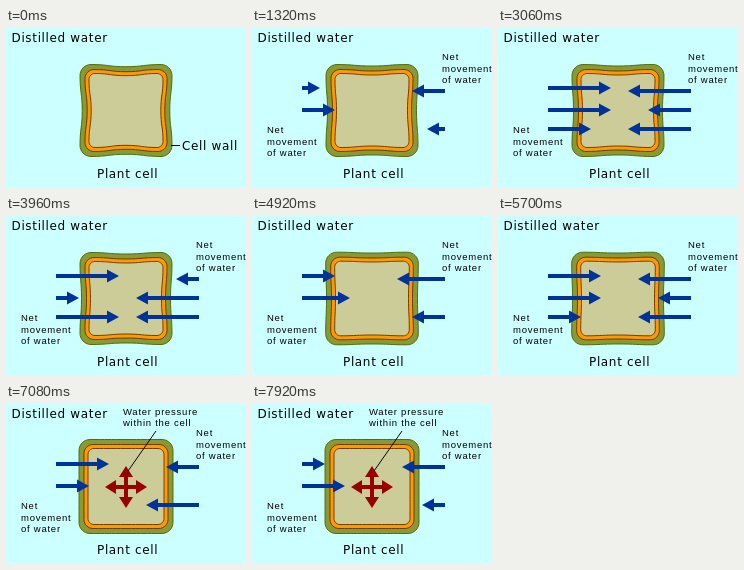
An HTML page that plays this animation: 240 px wide and 160 px high, repeating every 8000 ms.

```html
<!DOCTYPE html>
<html lang="en">
<head>
<meta charset="utf-8">
<title>Water entering a plant cell</title>
<style>
html, body { margin: 0; width: 100%; height: 100%; overflow: hidden; background: #cff; }
svg { display: block; width: 240px; height: 160px; }
text { font: 12px "DejaVu Sans", sans-serif; letter-spacing: .65px; fill: #000; }
text.small { font: 9.5px "Liberation Sans", sans-serif; letter-spacing: .75px; }
</style>
</head>
<body>
<svg id="stage" viewBox="0 0 240 160"></svg>
<script>
const LOOP = 8000, TICK = 180, STEP = 5, HEAD = 13;
const BLUE = '#039', RED = '#900';
const stage = document.getElementById('stage');

// Each run: start, end, longest length. Arrows grow one step per tick.
const upper = [[600, 3540, 63], [3600, 6300, 53], [6360, LOOP, 43]];
const outer = [[1140, 4080, 63], [4140, 7500, 53], [7560, LOOP, 43]];
const inner = [[1980, 4920, 63], [4980, 6840, 53]];
// side (1 points right), y, runs, first time shown
const arrows = [
  [1, 60, outer, 0], [1, 82, upper, 960], [1, 101, inner, 0],
  [-1, 63, upper, 0], [-1, 82, inner, 0], [-1, 101, outer, 0]
];

// Cell shapes: time, growth of the outline, dent of the sides
const shapes = [[0, 0, 2.2], [1080, 0, 1.5], [4800, .3, .8], [6720, 1, 0]];

const text = (x, y, s, cls = '') => `<text x="${x}" y="${y}" class="${cls}">${s}</text>`;
const lines = (x, y, list) => list.map((s, i) => text(x, y + 11.5 * i, s, 'small')).join('');
const line = (x1, y1, x2, y2) =>
  `<path d="M${x1} ${y1}L${x2} ${y2}" stroke="#000" fill="none"/>`;

// Rounded square with dented sides: one quarter, turned four times
function ring(inset, grow, dent, r, fill, edge) {
  const h = 46 + grow - inset, c = h - r, q = c / 2, k = h - r * .45;
  const turn = (x, y, i) => [[x, y], [-y, x], [-x, -y], [y, -x]][i].join(' ');
  let d = '';
  for (let i = 0; i < 4; i++) {
    const p = (x, y) => turn(x, y, i);
    d += `${i ? 'L' : 'M'}${p(-c, -h)}` +
      `C${p(-q, -h)} ${p(-q, dent - h)} ${p(0, dent - h)}` +
      `S${p(q, -h)} ${p(c, -h)}C${p(k, -h)} ${p(h, -k)} ${p(h, -c)}`;
  }
  return `<path transform="translate(120 82.5)" d="${d}Z" fill="${fill}" ` +
    `stroke="${edge}" stroke-width=".9"/>`;
}

function cell(t) {
  const [, grow, dent] = shapes.filter(s => s[0] <= t).pop();
  return ring(0, grow, dent, 11, '#8a9933', '#460') + ring(5, grow, dent, 9, '#f90', '#630') +
    ring(9, grow, dent, 6, '#cc9', '#630');
}

function arrow([dir, y, runs, shown], t) {
  const run = runs.find(r => t >= r[0] && t < r[1]);
  if (!run || t < shown) return '';
  const len = Math.min(run[2], HEAD + STEP * Math.floor((t - run[0]) / TICK));
  const x = dir > 0 ? 50 : 193, back = len - HEAD + 1;
  return `<path transform="translate(${x} ${y}) scale(${dir} 1)" fill="${BLUE}" ` +
    `d="M0 -2H${back}V-6.5L${len} 0L${back} 6.5V2H0Z"/>`;
}

function pressure() {
  const arm = [0, 90, 180, 270].map(a =>
    `<path transform="translate(120 83) rotate(${a})" fill="${RED}" ` +
    `d="M0 -2H10V-7L21 0L10 7V2H0Z"/>`).join('');
  return arm + line(150, 27, 122, 67) + lines(117, 10.5, ['Water pressure', 'within the cell']);
}

function draw(t) {
  const net = ['Net', 'movement', 'of water'];
  let s = '<rect width="240" height="160" fill="#cff"/>' +
    text(5.5, 13.5, 'Distilled water') + text(91, 150, 'Plant cell') + cell(t);
  if (t < 720) s += line(165, 117.5, 174, 117.5) + text(176, 122, 'Cell wall');
  if (t >= 1080) s += lines(190, 32, net) + lines(15, 105, net);
  if (t >= 6840) s += pressure();
  stage.innerHTML = s + arrows.map(a => arrow(a, t)).join('');
}

const begin = performance.now();
function frame() {
  draw((performance.now() - begin) % LOOP);
  requestAnimationFrame(frame);
}
frame();
</script>
</body>
</html>
```
